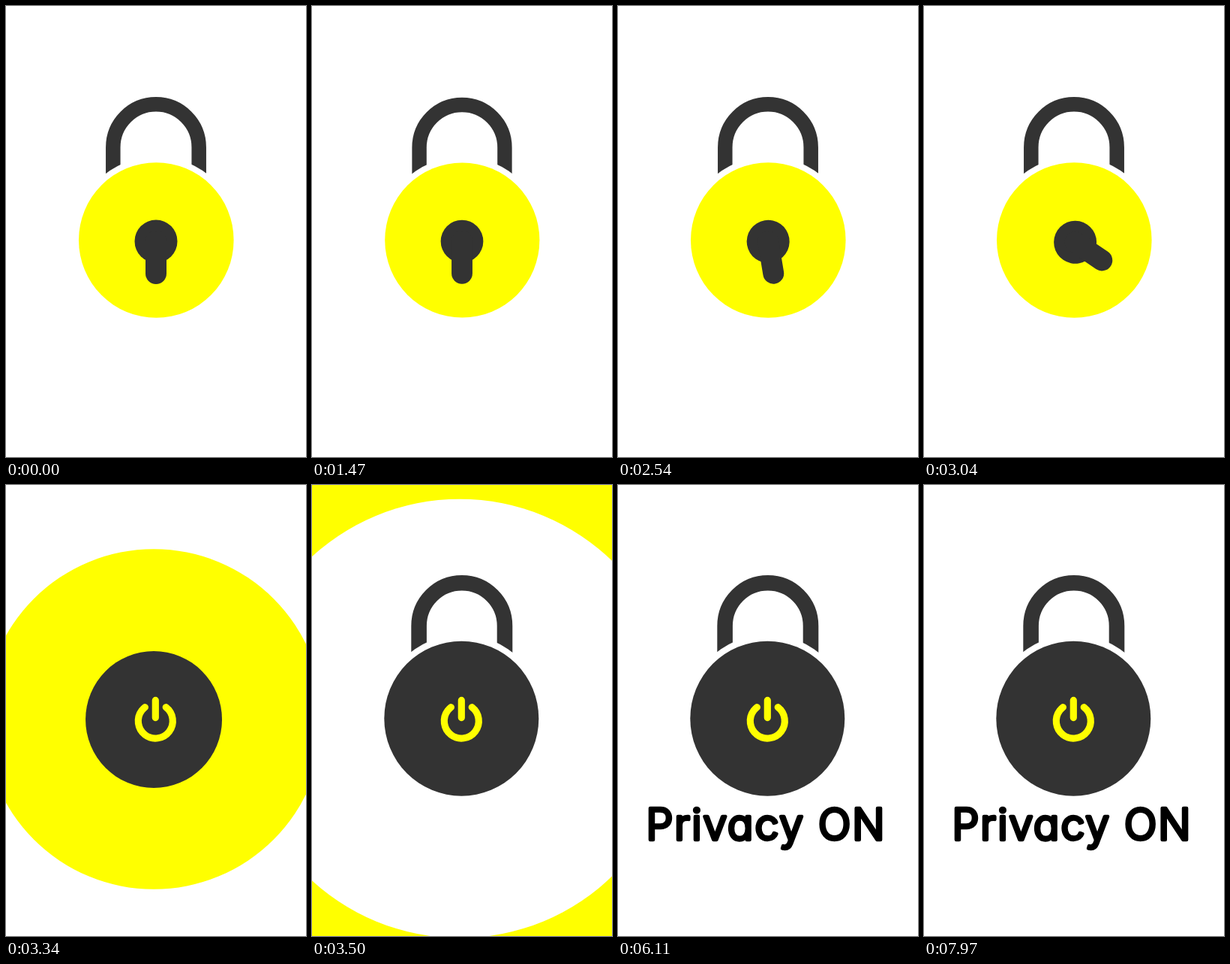
These frames come from a looping animation (400 px wide and 600 px high, 8000 ms). An HTML page with a canvas:

```html
<!DOCTYPE html>
<html lang="en">
<head>
<meta charset="utf-8">
<title>Privacy ON</title>
<style>
  html, body { margin: 0; width: 100%; height: 100%; overflow: hidden; background: #fff; }
  canvas, svg { position: absolute; left: 0; top: 0; width: 400px; height: 600px; }
  text {
    font: 300 57px Inter, Lato, sans-serif;
    font-feature-settings: "cv11";
    letter-spacing: 2px;
    text-anchor: middle;
    fill: #000;
    stroke: #000;
    stroke-width: 4.6px;
    stroke-linejoin: round;
  }
</style>
</head>
<body>
<canvas id="stage" width="400" height="600"></canvas>
<svg viewBox="0 0 400 600"><text id="label" x="197.5" y="471.6" opacity="0">Privacy ON</text></svg>
<script>
const ctx = document.getElementById('stage').getContext('2d');
const label = document.getElementById('label');
const LOOP = 8000, DARK = '#333', YELLOW = '#ff0', WHITE = '#fff';
const TAU = Math.PI * 2;

const progress = (t, from, to) => Math.min(1, Math.max(0, (t - from) / (to - from)));
const mix = (a, b, p) => a + (b - a) * p;
const easeInOut = p => (1 - Math.cos(Math.PI * p)) / 2;

function disc(x, y, r, color) {
  ctx.fillStyle = color;
  ctx.beginPath();
  ctx.arc(x, y, r, 0, TAU);
  ctx.fill();
}

function pen(width, color, cap) {
  ctx.lineWidth = width;
  ctx.strokeStyle = color;
  ctx.lineCap = cap;
  ctx.beginPath();
}

function scaled(x, y, s, draw) {
  ctx.save();
  ctx.translate(x, y);
  ctx.scale(s, s);
  ctx.translate(-x, -y);
  draw();
  ctx.restore();
}

// Arch whose feet are trimmed by a white circle around the body
function shackle(x, y, width, bodyX, bodyY) {
  pen(width, DARK, 'butt');
  ctx.moveTo(x - 57.2, 240);
  ctx.arc(x, y, 57.2, Math.PI, 0);
  ctx.lineTo(x + 57.2, 240);
  ctx.stroke();
  disc(bodyX, bodyY, 111.3, WHITE);
}

function keyhole(angle) {
  ctx.save();
  ctx.translate(202, 312.1);
  ctx.rotate(angle);
  disc(-2, 0.9, 28.5, DARK);
  pen(28, DARK, 'round');
  ctx.moveTo(-2, 0.9);
  ctx.lineTo(-2, 43.9);
  ctx.stroke();
  ctx.restore();
}

function powerIcon() {
  const gap = 0.65, up = -Math.PI / 2;
  pen(9.2, YELLOW, 'round');
  ctx.arc(199.3, 314, 23, up + gap, up - gap + TAU);
  ctx.moveTo(199.3, 286.4);
  ctx.lineTo(199.3, 309.6);
  ctx.stroke();
}

function closedLock(t) {
  const dip = Math.sin(Math.PI * progress(t, 1415, 2185)) ** 2;
  const turn = easeInOut(progress(t, 2325, 3140)) * -58 * Math.PI / 180;
  const grow = 122.2 * (Math.max(0, t - 3055) / 285) ** 1.8;
  const small = 1 - 0.094 * dip;
  scaled(200, 266, small, () => shackle(200, 188, 19.5, 200.3, 311.5));
  disc(mix(200.3, 197, progress(t, 3055, 3340)), 311.5,
       103.3 * (1 - 0.039 * dip) + grow, YELLOW);
  scaled(200, 311.5, small, () => keyhole(turn));
}

function privateLock(t) {
  const settle = progress(t, 3340, 3400);
  const x = t < 3340 ? mix(201, 197, progress(t, 3060, 3340)) : mix(197, 199.3, settle);
  const y = mix(312, 310.7, settle);
  if (t > 3345) {
    ctx.save();
    ctx.beginPath();
    ctx.arc(197, 310.7, 90 + 200.3 * ((t - 3345) / 155) ** 1.3, 0, TAU);
    ctx.clip();
    ctx.fillStyle = WHITE;
    ctx.fillRect(0, 0, 400, 600);
    shackle(199.8, 187.4, 20.6, 199.3, 310.7);
    ctx.restore();
  }
  disc(x, y, mix(28.5, 103, progress(t, 3060, 3395)), DARK);
  const pop = easeInOut(progress(t, 3140, 3300));
  if (pop > 0) scaled(199.3, 312, pop, powerIcon);
}

function render(t) {
  ctx.fillStyle = WHITE;
  ctx.fillRect(0, 0, 400, 600);
  closedLock(t);
  if (t > 3060) privateLock(t);
  label.setAttribute('opacity', easeInOut(progress(t, 3550, 3850)));
}

const start = performance.now();
function tick() {
  render((performance.now() - start) % LOOP);
  requestAnimationFrame(tick);
}
tick();
</script>
</body>
</html>
```
